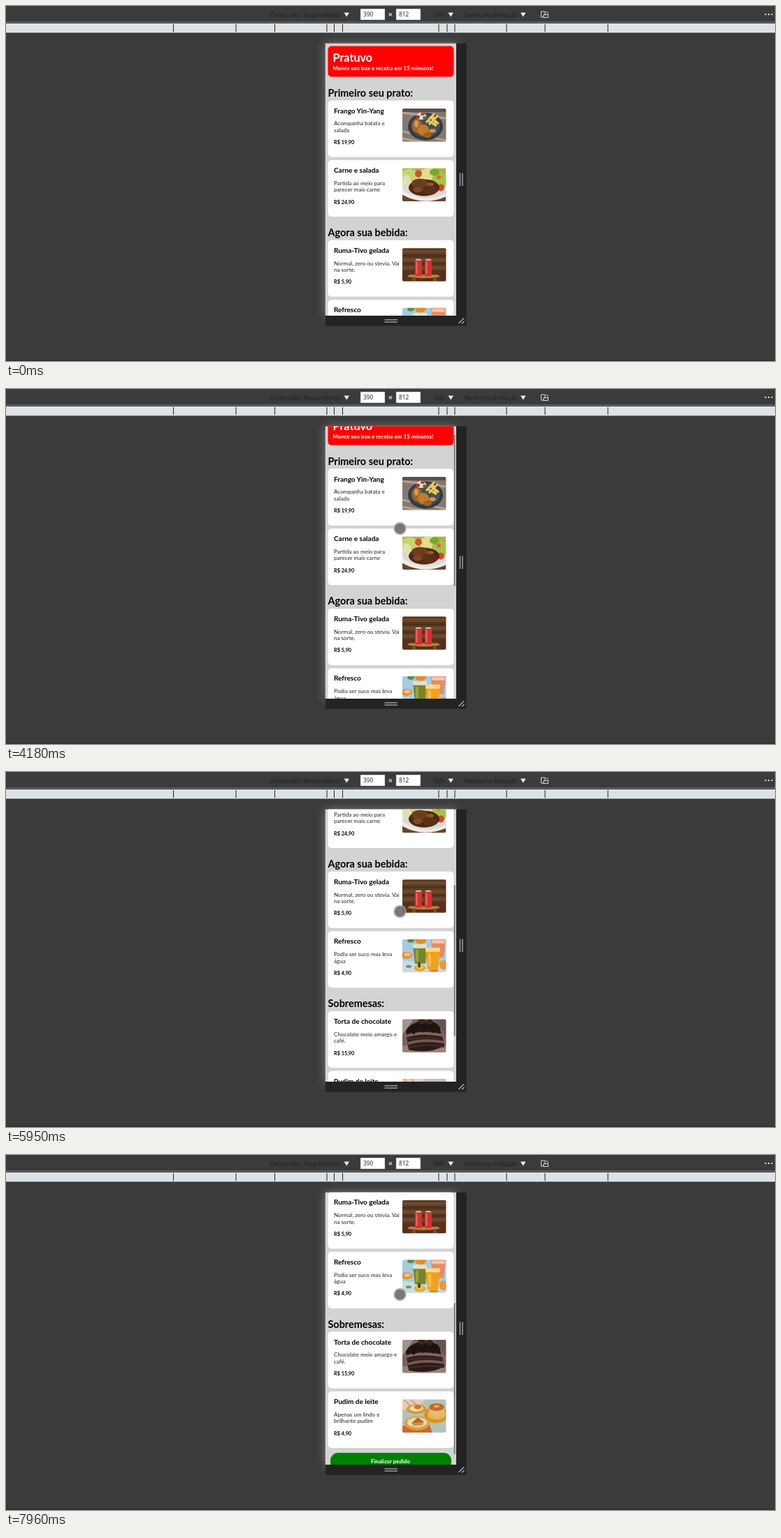
Animation of 1100 by 509 pixels, one loop 8 s. Source, as an HTML page:

```html
<!DOCTYPE html>
<html lang="pt-BR">
<head>
<meta charset="utf-8">
<title>Menu</title>
<style>
  html, body { margin: 0; width: 100%; height: 100%; overflow: hidden; background: #3b3b3b; }
  svg { display: block; }
  text { font-family: Lato, sans-serif; white-space: pre; }
  .bold { font-weight: 700; }
  .bar text { font-family: "Open Sans", sans-serif; font-size: 8.3px; fill: #202020; }
</style>
</head>
<body>
<svg id="stage" width="1100" height="509" viewBox="0 0 1100 509">
  <defs>
    <clipPath id="view"><rect x="456.5" y="53.5" width="187.5" height="390.5"/></clipPath>
    <clipPath id="photo"><rect width="62.5" height="47.5" rx="2"/></clipPath>
    <filter id="blur" x="-30%" y="-20%" width="160%" height="140%"><feGaussianBlur stdDeviation="7"/></filter>
    <filter id="soft"><feGaussianBlur stdDeviation=".45"/></filter>
  </defs>
  <rect width="1100" height="509" fill="#3b3b3b"/>
  <rect y="507.5" width="1100" height="1.5" fill="#2f2f2f"/>
  <g class="bar" id="bar">
    <rect y="22.6" width="1100" height="1.2" fill="#777"/>
    <rect y="25" width="1100" height="13.3" fill="#dde2e6"/>
    <text x="378" y="15.5">Dimensões: Respondendo</text>
    <text x="611" y="15.5">59%</text>
    <text x="656" y="15.5">Nenhuma limitação</text>
    <path d="M483.5 9.5h7.5l-3.75 6zM632.5 9.5h7.5l-3.75 6zM736 9.5h7.5l-3.75 6z" fill="#eee"/>
    <path d="M507 4h35v16h-35zM558 4h35v16h-35z" fill="#fff" stroke="#777" stroke-width=".5"/>
    <text x="511" y="15.3">390</text>
    <text x="562" y="15.3">812</text>
    <path d="M547.7 10.2l4.2 4.2m0-4.2l-4.2 4.2" stroke="#ddd" stroke-width="1.2"/>
    <g fill="none" stroke="#ddd">
      <path d="M771 12.5v-4.500h-5.500v8h4"/>
      <path d="M769 12.500h6.500v4h-6.500z"/>
      <path d="M772.500 8.500q3 0 3 3"/>
    </g>
    <path d="M1085.500 11h2v2h-2zm4.500 0h2v2h-2zm4.500 0h2v2h-2z" fill="#ddd"/>
  </g>
  <rect x="457" y="54" width="187" height="390" fill="#fff" opacity=".32" filter="url(#blur)"/>
  <path d="M457 53.500h201.500v405H457z" fill="#232323"/>
  <rect id="strip" x="644" y="54" width="14.500" height="390" fill="#232323"/>
  <path d="M649.500 239.500v18.500M653 239.500v18.500M541.500 449.800h18.500M541.500 453.200h18.500M647.500 455l7.500-7.500M652 455.500l3.500-3.500"
        stroke="#b0b0b0" stroke-width="1.300"/>
  <g clip-path="url(#view)">
    <rect x="456.500" y="53" width="188" height="392" fill="#d3d3d3"/>
    <g id="page"></g>
    <rect id="thumb" x="640.800" y="54" width="1.800" height="217" rx=".9" fill="#777"/>
  </g>
  <g id="touch">
    <circle r="9.400" fill="#aaa" opacity=".75"/>
    <circle r="7.600" fill="#6b6464" opacity=".8"/>
  </g>
  <path id="arrow" d="M.4.500v13l3-2.800 2 4.700 2-.9-2-4.500h4.200z" fill="#fff" stroke="#111" stroke-width=".8"/>
</svg>
<script>
const $ = id => document.getElementById(id);

// SVG markup helpers
const box = (x, y, w, h, fill, r = 0) =>
  `<rect x="${x}" y="${y}" width="${w}" height="${h}" rx="${r}" fill="${fill}"/>`;
const oval = (x, y, rx, ry, fill) =>
  `<ellipse cx="${x}" cy="${y}" rx="${rx}" ry="${ry}" fill="${fill}"/>`;
const path = (d, fill) => `<path d="${d}" fill="${fill}"/>`;
const line = (d, stroke, w) => `<path d="${d}" fill="none" stroke="${stroke}" stroke-width="${w}"/>`;
const text = (x, y, size, str, bold = true, fill = '#000') =>
  `<text x="${x}" y="${y}" font-size="${size}" fill="${fill}"${bold ? ' class="bold"' : ''}>${str}</text>`;
const backdrop = fill => box(-2, -2, 67, 52, fill);

const photos = {
  chicken: backdrop('#85786d') +
    line('M0 6L62 14M0 33L62 46M0 43L40 50', '#b0a294', 3) +
    box(0, 0, 62, 5, '#5c5148') +
    oval(33, 26, 25, 19.5, '#333a44') + oval(33, 25, 21, 16, '#46505a') +
    line('M34 20L46 7M38 23L51 10M39 12L52 22M36 17L49 25M43 9L48 24', '#edc75a', 3) +
    oval(27, 11, 7, 5, '#e9e4d3') + oval(22, 12, 3, 2.5, '#bd2d27') + oval(29, 8, 3, 2, '#ce3b30') +
    oval(32, 13, 3, 2, '#4b7c2e') +
    oval(21, 25, 7, 10, '#a9651f') + oval(30, 31, 8, 8, '#c07c2c') +
    oval(20, 22, 3, 5, '#d79a4d') + oval(36, 38, 6, 4, '#a3601e') + oval(43, 32, 5, 3, '#cf9145'),
  steak: backdrop('#dcd9d2') +
    box(0, 0, 62, 14, '#a8b548') + oval(10, 10, 12, 9, '#c9d46a') + oval(38, 9, 14, 9, '#dfdf8d') +
    oval(53, 18, 11, 13, '#a5c24b') + oval(46, 6, 7, 5, '#7fa531') + oval(6, 18, 6, 8, '#dde2b0') +
    oval(23, 8, 5, 5, '#d8502b') + oval(55, 28, 5, 5, '#d4472b') + oval(52, 13, 3, 3, '#e4663c') +
    path('M0 38Q30 54 62 40V48H0z', '#65462f') + path('M0 31Q30 52 62 36V41Q30 55 0 38z', '#efece6') +
    oval(31, 28, 22, 12, '#4b2814') + oval(25, 22, 12, 7, '#6d3d1d') + oval(39, 31, 11, 7, '#5c3016') +
    oval(22, 31, 7, 4, '#7b4a25') + oval(40, 23, 5, 2.5, '#8d5a30'),
  cans: backdrop('#573820') +
    line('M0 5H62M0 17H62M0 28H62', '#6c482b', 5) + line('M0 11H62M0 22.5H62', '#3d2615', 1) +
    box(0, 33, 62, 15, '#57301b') + path('M10 38H51L54 41Q32 45 7 41z', '#bd7d3d') +
    box(14, 42, 5, 6, '#7a4926') + box(44, 42, 5, 6, '#7a4926') +
    [18, 32].map(x => box(x, 16, 10, 24, '#d5302f', 2) + box(x + 1, 15.5, 8, 2, '#c9c4be', 1) +
      box(x + 1.5, 19, 2, 18, '#ef6a60', 1)).join(''),
  juice: backdrop('#a4cce3') +
    path('M0 30L62 38V48H0z', '#c7dce4') +
    oval(26, 1, 8, 6, '#e98a25') + oval(6, 23, 8, 5, '#e58a2f') + oval(7, 22, 5, 3, '#f5bd72') +
    oval(12, 2, 5, 3, '#608c36') +
    path('M41 0H62L59 26H43z', '#e98a62') + box(42, 1, 19, 5, '#f6c5ab', 2) + oval(59, 37, 6, 7, '#ee9440') +
    path('M15 10H35L33 35H18z', '#77862a') + box(15, 7, 20, 6, '#dfe3cf', 2) + box(19, 15, 4, 17, '#9aa53c', 2) +
    path('M33 15H54L51 43H36z', '#f1a21c') + box(33, 12, 21, 6, '#f7d995', 2) + box(37, 20, 4, 19, '#f8bc45', 2) +
    oval(25, 41, 8, 5, '#efa125') + oval(25, 40, 5, 3, '#f8c75b') +
    oval(24, 37, 2, 4, '#42502a') + oval(9, 39, 4, 2, '#6f9850') + oval(45, 45, 7, 2, '#d98b26'),
  cake: backdrop('#77645e') +
    path('M0 0H16L0 22z', '#a09490') + path('M46 0H63V25z', '#665552') +
    path('M0 38H63V48H0z', '#9b8178') +
    path('M5 17Q10 5 30 3Q48 2 53 10L60 38Q40 50 9 44z', '#2a1b18') +
    line('M6 24Q28 17 57 23', '#84645b', 4) + line('M8 35Q30 28 59 33', '#775850', 4) +
    line('M7 29Q30 24 58 28M9 41Q31 35 60 39', '#3e2924', 3) +
    path('M6 16Q15 2 34 3Q50 3 54 14L53 21L49 16L44 20L38 15L30 19L24 15L16 22L11 17L7 22z', '#1e1412') +
    oval(28, 3, 6, 4, '#3a2822') + oval(39, 4, 5, 4, '#34231e'),
  pudding: backdrop('#b2c3bc') +
    path('M0 0H32L24 10L0 16z', '#e8cabb') + line('M2 0L14 12M12 0L22 10', '#dc9c80', 2) +
    oval(48, 22, 17, 12, '#d99426') + oval(49, 21, 13, 8, '#e8b652') +
    path('M38 11Q38 24 49 25Q61 24 60 11z', '#e7b981') + oval(49, 11, 11, 5.5, '#c26d20') + oval(49, 10, 4, 1.8, '#e3ad65') +
    oval(20, 14, 14, 7, '#d7972e') + oval(20, 13, 10, 4.5, '#eed5a6') + oval(22, 11, 5, 3, '#c7782b') +
    path('M0 38L38 34L43 48H0z', '#cd6931') +
    oval(21, 34, 18, 10, '#dba33e') + oval(21, 33, 14, 7, '#f0dab3') +
    path('M13 34L22 26L31 32L29 37L16 38z', '#d49342') + path('M13 34L22 26L31 32L22 33z', '#b8651f')
};

const card = (y, title, a, b, price, pic) =>
  box(460.5, y, 180, 81, '#fff', 5) +
  text(469, y + 18, 10, title) +
  text(469, y + 35.7, 8.1, a, false, '#222') +
  text(469, y + 45.4, 8.1, b, false, '#222') +
  text(469, y + 62.6, 7.3, `R$ ${price}`) +
  `<g transform="translate(567 ${y + 11.4})" clip-path="url(#photo)"><g filter="url(#soft)">${photos[pic]}</g></g>`;

$('page').innerHTML =
  box(460.5, 57.5, 180, 44, '#f00', 5) +
  text(467.5, 80, 16.2, 'Pratuvo', true, '#fff') +
  text(467.5, 92, 8.1, 'Monte seu box e receba em 15 minutos!', true, '#fff') +
  text(460.5, 129.8, 14.4, 'Primeiro seu prato:') +
  card(135.5, 'Frango Yin-Yang', 'Acompanha batata e', 'salada', '19,90', 'chicken') +
  card(221, 'Carne e salada', 'Partida ao meio para', 'parecer mais carne', '24,90', 'steak') +
  text(460.5, 330, 14.4, 'Agora sua bebida:') +
  card(335.8, 'Ruma-Tivo gelada', 'Normal, zero ou stevia. Vai', 'na sorte.', '5,90', 'cans') +
  card(421.3, 'Refresco', 'Podia ser suco mas leva', 'água', '4,90', 'juice') +
  text(460.5, 530.2, 14.4, 'Sobremesas:') +
  card(536, 'Torta de chocolate', 'Chocolate meio amargo e', 'café.', '15,90', 'cake') +
  card(621.5, 'Pudim de leite', 'Apenas um lindo e', 'brilhante pudim', '4,90', 'pudding') +
  box(464, 709.5, 173, 25, 'green', 11) +
  text(522, 724.8, 8, 'Finalizar pedido', true, '#fff');

$('bar').insertAdjacentHTML('beforeend',
  [239, 328.5, 384, 458.5, 469, 481, 618.5, 630.5, 641.5, 715.5, 770.5, 860.5]
    .map(x => box(x, 26, 1, 11, '#222')).join(''));

// Each row: time in ms, then the values reached at that time
const scrollKeys = [
  [4050, 0], [4117, 3], [4250, 38], [4390, 80], [4522, 113], [4660, 135], [4790, 143],
  [5602, 143], [5670, 145], [5805, 167], [5940, 193], [6075, 220], [6210, 245], [6345, 279], [6420, 286],
  [6460, 286], [6540, 290], [6640, 299], [6750, 303], [7830, 303], [7897, 298], [7965, 282.5]
];
const thumbKeys = [
  [4050, 0], [4110, 1], [5060, 1], [5130, .85], [5390, 0], [5610, 0], [5670, 1],
  [6980, 1], [7040, .85], [7300, 0], [7830, 0], [7890, 1]
];
const pointerKeys = [
  [270, 1004, 485], [405, 885, 408], [520, 814, 362], [930, 814, 362], [1080, 750, 316],
  [1215, 680, 268], [1350, 641, 251], [1630, 641, 251], [1690, 648, 249], [1940, 694, 237],
  [2440, 694, 237], [2490, 685, 234], [2565, 685, 234], [2700, 668, 242], [2835, 638, 246],
  [3037, 594, 230], [3300, 563.5, 205], [3780, 563.5, 205], [3840, 563.5, 203], [3970, 563.5, 200]
];

function sample(keys, t) {
  const i = keys.findIndex(k => k[0] > t);
  if (i < 0) return keys[keys.length - 1].slice(1);
  if (i === 0) return keys[0].slice(1);
  const a = keys[i - 1], b = keys[i], p = (t - a[0]) / (b[0] - a[0]);
  return a.slice(1).map((v, n) => v + (b[n + 1] - v) * p);
}

const LOOP = 8000, STEP = 67.5;
const start = performance.now();

function draw(now) {
  const time = Math.max(0, now - start) % LOOP;
  const t = Math.floor((time + 20) / STEP) * STEP;
  const [scroll] = sample(scrollKeys, t);
  const [x, y] = sample(pointerKeys, t);
  const inside = x < 644;

  $('page').setAttribute('transform', `translate(0 ${-scroll})`);
  $('thumb').setAttribute('y', 54 + scroll * .559);
  $('thumb').setAttribute('opacity', sample(thumbKeys, t)[0]);
  $('strip').setAttribute('fill', t > 1670 && t < 1800 ? '#303030' : '#232323');
  for (const id of ['touch', 'arrow']) {
    const shown = id === 'touch' ? inside : !inside && time >= 250;
    $(id).setAttribute('transform', `translate(${x} ${y})`);
    $(id).setAttribute('visibility', shown ? 'visible' : 'hidden');
  }
  requestAnimationFrame(draw);
}
draw(start);
</script>
</body>
</html>
```
